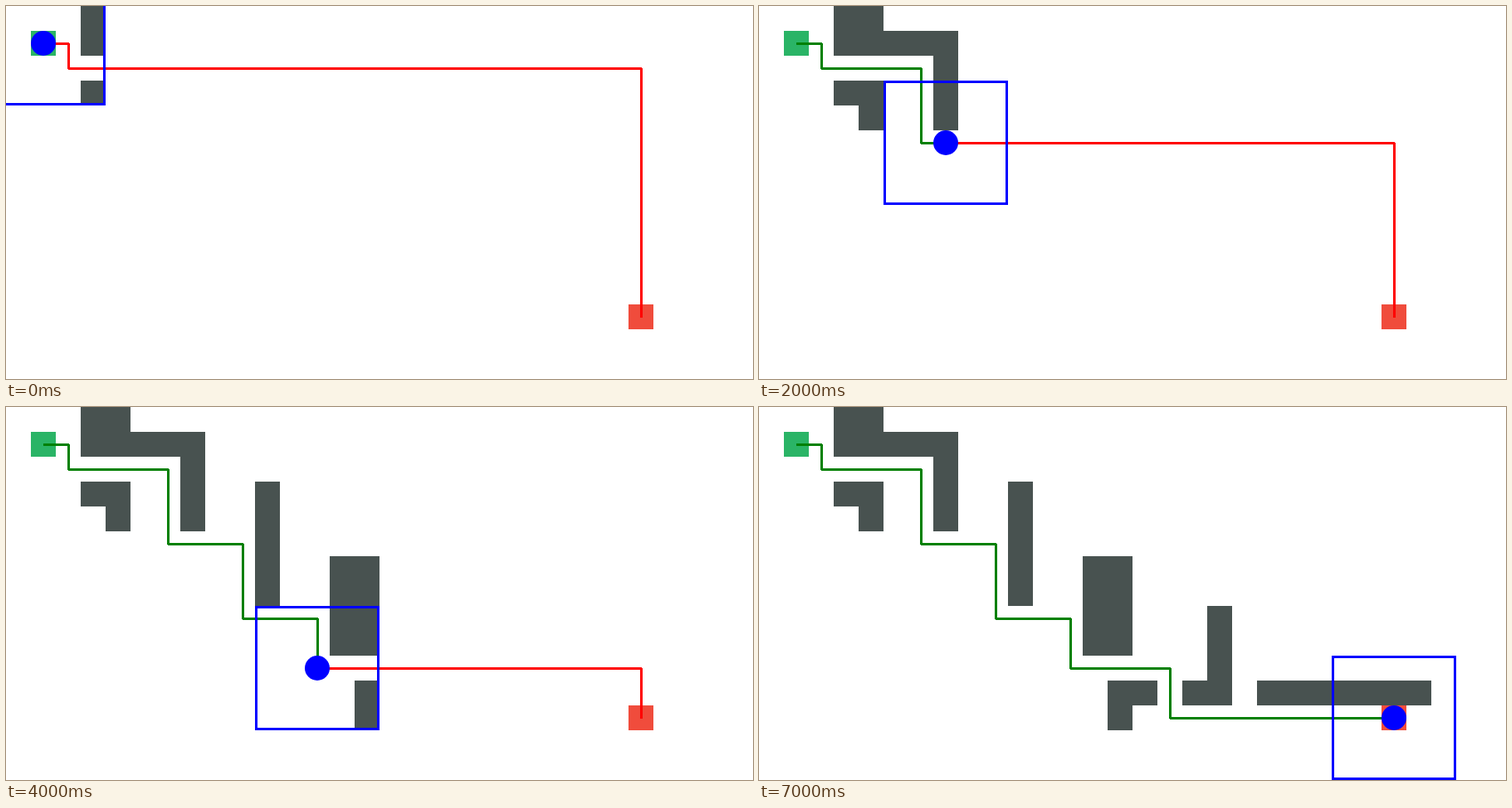
These frames come from a looping animation (900 by 450 pixels, 7.2 s). An HTML page with a canvas:

```html
<!DOCTYPE html>
<html lang="en">
<head>
<meta charset="utf-8">
<title>Grid path planning</title>
<style>
  html, body { margin: 0; overflow: hidden; background: #fff; }
  canvas { display: block; }
</style>
</head>
<body>
<canvas width="900" height="450"></canvas>
<script>
const ctx = document.querySelector('canvas').getContext('2d');
const CELL = 30, STEP_MS = 200, SIGHT = 2;
const START = [1, 1], GOAL = [25, 12];

// Wall blocks in cells: x, y, width, height
const blocks = [
  [3, 0, 2, 2], [5, 1, 3, 1], [7, 2, 1, 3], [3, 3, 2, 1], [4, 4, 1, 1],
  [10, 3, 1, 5], [13, 6, 2, 4], [14, 11, 2, 1], [14, 12, 1, 1],
  [18, 8, 1, 4], [17, 11, 1, 1], [20, 11, 7, 1]
];
const walls = blocks.flatMap(([x, y, w, h]) =>
  Array.from({ length: w * h }, (_, i) => [x + i % w, y + Math.floor(i / w)]));

// Shortest route that turns down only where going right is blocked
function plan(x, y, known) {
  const blocked = known.some(([wx, wy]) => wx === x && wy === y);
  if (x > GOAL[0] || y > GOAL[1] || blocked) return null;
  if (x === GOAL[0] && y === GOAL[1]) return [GOAL];
  const rest = plan(x + 1, y, known) || plan(x, y + 1, known);
  return rest && [[x, y], ...rest];
}

// The robot sees nearby walls, and replans before its next move
function simulate() {
  const steps = [], trail = [START];
  let known = [], route;
  const look = ([x, y]) => {
    known = walls.filter(w => known.includes(w) ||
      Math.max(Math.abs(w[0] - x), Math.abs(w[1] - y)) <= SIGHT);
  };
  look(START);
  route = plan(...START, known);
  while (true) {
    steps.push({ trail: [...trail], route, known });
    if (route.length === 1) return steps;
    route = plan(...route[0], known).slice(1);
    trail.push(route[0]);
    look(route[0]);
  }
}

function fillCell([x, y], color) {
  ctx.fillStyle = color;
  ctx.fillRect(x * CELL, y * CELL, CELL, CELL);
}

function drawLine(cells, color) {
  ctx.fillStyle = color;
  for (let i = 1; i < cells.length; i++) {
    const [x, y] = cells[i - 1].map(v => (v + 0.5) * CELL);
    if (cells[i][0] > cells[i - 1][0]) ctx.fillRect(x, y - 1, CELL + 1, 3);
    else ctx.fillRect(x - 1, y, 3, CELL + 1);
  }
}

function draw({ trail, route, known }) {
  ctx.fillStyle = '#fff';
  ctx.fillRect(0, 0, 900, 450);
  known.forEach(cell => fillCell(cell, '#485250'));
  fillCell(START, '#2ab466');
  fillCell(GOAL, '#f04c3c');
  drawLine(trail, '#008000');
  drawLine(route, '#f00');

  const [x, y] = route[0].map(v => v * CELL);
  const size = (2 * SIGHT + 1) * CELL;
  ctx.strokeStyle = ctx.fillStyle = '#00f';
  ctx.lineWidth = 3;
  ctx.strokeRect(x - SIGHT * CELL + 1.5, y - SIGHT * CELL + 1.5, size - 3, size - 3);
  ctx.beginPath();
  ctx.arc(x + CELL / 2, y + CELL / 2, CELL / 2, 0, 2 * Math.PI);
  ctx.fill();
}

const steps = simulate();
const begin = performance.now();
function tick() {
  const elapsed = performance.now() - begin;
  draw(steps[Math.floor(elapsed / STEP_MS) % steps.length]);
  requestAnimationFrame(tick);
}
tick();
</script>
</body>
</html>
```
